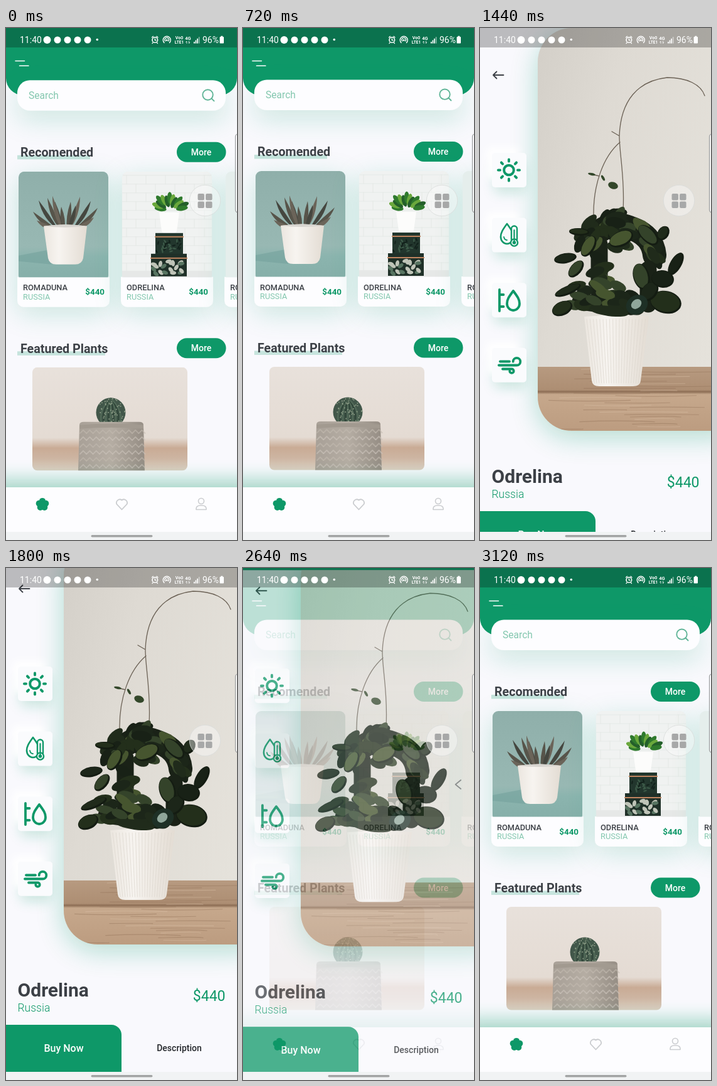
Recreate the animation shown at these times as an HTML page. Size 368x816 px, loop 3.24 s.

```html
<!DOCTYPE html>
<html lang="en">
<head>
<meta charset="utf-8">
<title>Plant shop</title>
<style>
html, body { margin: 0; width: 100%; height: 100%; overflow: hidden; background: #f9f9fd; }
svg { display: block; width: 100vw; height: 100vh; font-family: Roboto, sans-serif; }
</style>
</head>
<body>
<svg id="stage" viewBox="0 0 368 816" xmlns="http://www.w3.org/2000/svg"></svg>
<script>
const LOOP = 3240, STEP = 120;
const GREEN = '#0e9868', INK = '#3c4046', PAPER = '#f9f9fd';

// ---- drawing helpers ----
let seed = 7;
const rnd = (a = 0, b = 1) => {
  seed = (seed * 16807) % 2147483647;
  return a + (b - a) * seed / 2147483647;
};
const many = (n, fn) => Array.from({ length: n }, (_, i) => fn(i)).join('');
const rect = (x, y, w, h, fill, r = 0, more = '') =>
  `<rect x="${x}" y="${y}" width="${w}" height="${h}" rx="${r}" fill="${fill}" ${more}/>`;
const circle = (x, y, r, fill, more = '') => `<circle cx="${x}" cy="${y}" r="${r}" fill="${fill}" ${more}/>`;
const shape = (d, fill, more = '') => `<path d="${d}" fill="${fill}" ${more}/>`;
const line = (d, color, w, more = '') =>
  `<path d="${d}" fill="none" stroke="${color}" stroke-width="${w}" stroke-linecap="round" stroke-linejoin="round" ${more}/>`;
const text = (s, x, y, size, color, weight = 400, anchor = 'start') =>
  `<text x="${x}" y="${y}" font-size="${size}" fill="${color}" font-weight="${weight}" text-anchor="${anchor}">${s}</text>`;
const glow = (x, y, w, h, a, blur, r = 10) => rect(x, y, w, h, GREEN, r, `opacity="${a}" filter="url(#b${blur})"`);
const leaf = (x, y, rx, ry, turn, fill) =>
  `<ellipse rx="${rx}" ry="${ry}" fill="${fill}" transform="translate(${x} ${y}) rotate(${turn})"/>`;
const blade = (x, y, tx, ty, w, fill) => {
  const mx = (x + tx) / 2 + (tx - x) * .1, my = (y + ty) / 2 + 4;
  const len = Math.hypot(tx - x, ty - y), nx = (y - ty) / len * w, ny = (tx - x) / len * w;
  return shape(`M${x} ${y}Q${mx + nx} ${my + ny} ${tx} ${ty}Q${mx - nx} ${my - ny} ${x} ${y}`, fill);
};
const blur = n => `<filter id="b${n}" filterUnits="userSpaceOnUse" x="-150" y="-150" width="700" height="1200"><feGaussianBlur stdDeviation="${n}"/></filter>`;
const clip = (id, x, y, w, h, r) => `<clipPath id="${id}">${rect(x, y, w, h, '#000', r)}</clipPath>`;
const fade = (id, stops, dir = 'x2="0" y2="1"') => `<linearGradient id="${id}" x1="0" y1="0" ${dir}>` +
  stops.map(([o, c]) => `<stop offset="${o}" stop-color="${c}"/>`).join('') + '</linearGradient>';
const clipped = (id, body) => `<g clip-path="url(#${id})">${body}</g>`;

const defs = '<defs>' + [6, 10, 16, 22].map(blur).join('') +
  clip('pic1', 20, 228, 143, 175, 9) + clip('pic2', 185, 228, 143, 175, 9) +
  clip('pic3', 42, 540, 247, 164.5, 8) + clip('pic4', 92, 0, 330, 642, 54) +
  clip('page', 0, 0, 368, 816, 0) +
  fade('teal', [[0, '#8fafaa'], [.7, '#98b8b3'], [.8, '#8bb4ae'], [1, '#86afa9']]) +
  fade('sand', [[0, '#e8e1db'], [.68, '#e4dbd3'], [.78, '#c9ab95'], [.88, '#cdb5a2'], [1, '#dfd1c4']]) +
  fade('wall', [[0, '#d3cfc8'], [.35, '#dedad3'], [1, '#e5e2db']], 'x2="1" y2=".5"') +
  fade('pot', [[0, '#ebe6df'], [.35, '#f7f4f0'], [1, '#e3dcd3']], 'x2="1" y2="0"') +
  fade('stone', [[0, '#a8a097'], [.5, '#b5ada3'], [1, '#958d84']], 'x2="1" y2="0"') +
  fade('wood', [[0, '#b79a80'], [.36, '#ad8e73'], [.39, '#8c6d54'], [.43, '#c6a88c'], [1, '#bc9c80']]) +
  '</defs>';

// ---- pictures ----
const aloeTips = [
  [43, 292], [49, 306], [52, 274], [146, 286], [140, 301], [135, 275],
  [66, 270], [118, 268], [78, 276], [103, 276], [74, 267], [111, 282], [88, 284]
];
const aloe = rect(20, 228, 143, 170, 'url(#teal)') +
  shape('M20 362L72 352V376L20 371Z', '#76a29d', 'opacity=".6"') +
  aloeTips.map(([x, y], i) => blade(95 + (x - 95) * .28, 320, x, y, 6.5, ['#57544a', '#6b6459', '#454740'][i % 3])).join('') +
  shape('M60 315Q94 310 129 315L123 366Q121 376 110 376H80Q69 376 67 366Z', 'url(#pot)') +
  shape('M60 315Q94 310 129 315Q94 319 60 315', '#d8d5d0');

const boxes = rect(185, 228, 143, 170, '#f0f2f1') +
  many(12, r => line(`M185 ${234 + r * 14}H328` + many(5, k => `M${192 + k * 31 + (r % 2) * 15} ${234 + r * 14}v14`), '#e2e6e4', .8)) +
  rect(185, 386, 143, 12, '#e6e8e7') +
  many(13, i => {
    const a = (188 + i * 13.6) * Math.PI / 180, len = 13 + (i * 5 % 8);
    return leaf(261 + Math.cos(a) * len * 1.15, 289 + Math.sin(a) * len, 9.5, 4, 188 + i * 13.6, ['#2f7a2d', '#6aa83c', '#245f2a'][i % 3]);
  }) +
  shape('M244 293H276L272 323Q271 326 267 326H253Q249 326 248 323Z', '#fcfcfb') +
  rect(238, 326, 44, 35, '#22362d') + rect(231, 359, 57, 36, '#1f3028') +
  many(26, i => leaf(rnd(240, 280), rnd(336, 357), 3, 1.2, rnd(0, 180), i % 2 ? '#3c5a48' : '#12211b')) +
  many(18, i => leaf(rnd(235, 284), rnd(371, 391), 5, 3, rnd(0, 180), i % 3 ? '#bfc4b8' : '#577461')) +
  rect(237, 331, 46, 2, '#bf8560') + rect(230, 365, 59, 2, '#bf8560');

const cactus = rect(42, 540, 247, 165, 'url(#sand)') +
  circle(167, 612, 23.5, '#42574a') +
  many(9, i => line(`M167 590Q${143 + i * 6} 612 ${155 + i * 3} 636`, i % 2 ? '#2f4438' : '#526a58', 2)) +
  many(60, () => {
    const a = rnd(0, 6.28), r = 22.5 * Math.sqrt(rnd());
    return circle(167 + Math.cos(a) * r, 612 + Math.sin(a) * r, 1, '#8c9c86');
  }) +
  shape('M117 632Q117 627 124 627H212Q219 627 219 632L221 706H115Z', 'url(#stone)') +
  many(6, r => many(10, k => line(`M${118 + k * 10.4} ${645 + r * 11}l5 -5l5 5`, r % 2 ? '#cbc4bb' : '#c2bab0', 1.8, 'opacity=".6"'))) +
  shape('M117 632Q168 627 219 632L219 638Q168 634 117 638Z', '#a29a90');

// dark masses first, then scattered leaves, then the outer ones
const tones = ['#182116', '#232f1b', '#34432a', '#1c2619', '#46552f', '#202b1b'];
const tone = i => tones[i % tones.length];
const cluster = (n, x, y, w, h, tilt) => many(n, i =>
  leaf(x + rnd(-w, w), y + rnd(-h, h), rnd(12, 18), rnd(6.5, 9.5), tilt + rnd(-35, 35), tone(i)));
const bigLeaves = [
  [131, 447, 17, 11, -25], [153, 384, 16, 9, -50], [136, 367, 18, 8, -10], [173, 348, 18, 10, -60],
  [292, 327, 12, 9, -60], [312, 376, 20, 9, -60], [296, 437, 25, 18, 12], [257, 396, 21, 13, 75],
  [270, 420, 17, 12, -50], [225, 336, 20, 12, -25], [140, 418, 22, 7, -22], [291, 400, 18, 14, 8],
  [158, 325, 16, 6, 4], [268, 330, 20, 11, 45]
];
const ficus = rect(92, 0, 330, 642, 'url(#wall)') +
  rect(92, 540, 330, 102, 'url(#wood)') +
  many(26, i => line(`M${rnd(92, 260)} ${544 + i * 3.8}q60 ${rnd(-3, 3)} ${rnd(50, 150)} 0`, i % 3 ? '#8d6d53' : '#dcc3aa', 1.1, 'opacity=".4"')) +
  line('M181 300C180 250 196 205 223 182M228 290C231 240 222 200 222 172C224 115 252 84 298 79C330 79 352 90 358 108M210 165L222 172M190 236L174 232', '#6b6155', 1.3) +
  leaf(212, 251, 8, 5.5, 20, '#33472a') + leaf(178, 233, 6, 2, 12, '#33472a') + leaf(196, 239, 5, 2, 60, '#33472a') +
  line('M178 335Q205 305 238 318Q275 330 278 362', '#1a2217', 38) +
  line('M190 345V420M160 436Q200 442 250 444M268 385V440', '#1a2217', 27) +
  cluster(16, 200, 310, 28, 18, -30) + cluster(16, 244, 326, 30, 24, 25) +
  cluster(8, 172, 340, 16, 16, -40) + cluster(10, 190, 382, 12, 26, 15) +
  cluster(6, 274, 362, 9, 18, 50) + cluster(24, 195, 428, 50, 20, 8) +
  bigLeaves.map((l, i) => leaf(...l, '#141c12') + leaf(l[0] - 1, l[1] - 1, l[2] - 1.5, l[3] - 2, l[4], tone(i + 1))).join('') +
  shape('M166 460Q217 455 269 460L256 562Q255 571 244 571H190Q179 571 178 562Z', 'url(#pot)') +
  many(19, i => line(`M${170 + i * 5.2} 464L${182 + i * 3.9} 566`, '#dcd6cd', 1, 'opacity=".7"')) +
  leaf(205, 451, 32, 8, 8, '#202b1b') +
  leaf(250, 441, 18, 15, -30, '#1e3026') + leaf(249, 440, 9, 7, -40, '#8fa69a');

// ---- home page ----
const more = y => rect(272, y, 78.5, 32, GREEN, 16) + text('More', 311, y + 21, 14, '#fff', 500, 'middle');
const heading = (s, y, w) => rect(18, y + 5, w, 6.5, GREEN, 0, 'opacity=".22"') + text(s, 23, y + 7.3, 19.7, INK, 700) + more(y - 16);
const card = (x, name, pic) => glow(x, 238, 147, 216, .2, 22) +
  shape(`M${x} 396H${x + 147}V434a10 10 0 0 1 -10 10H${x + 10}a10 10 0 0 1 -10 -10Z`, '#fdfdff') + pic +
  rect(x, 396.5, 147, 20, '#fdfdff') +
  text(name, x + 9, 417.6, 12.8, INK, 500) + text('RUSSIA', x + 9, 432, 12.8, '#83c7ae') +
  text('$440', x + 139, 424.5, 13.4, GREEN, 700, 'end');

const tabs = glow(-30, 722, 430, 90, .4, 16, 0) + rect(0, 732, 368, 84, '#fdfdff') +
  many(5, i => {
    const a = (i * 72 - 90) * Math.PI / 180;
    return circle(58 + Math.cos(a) * 5.6, 759.5 + Math.sin(a) * 5.6, 5, GREEN);
  }) + circle(58, 759.5, 5, GREEN) +
  line('M184.5 767.5L176.5 759A5.3 5.3 0 0 1 184.5 752.5A5.3 5.3 0 0 1 192.5 759Z', '#cbcdd0', 1.8) +
  circle(311, 754, 4.5, 'none', 'stroke="#cbcdd0" stroke-width="1.6"') +
  line('M303 767.5V766a6 5 0 0 1 6 -5h4a6 5 0 0 1 6 5v1.5Z', '#cbcdd0', 1.6);

const home = rect(0, 0, 368, 816, PAPER) +
  shape('M0 0H368V80a27 27 0 0 1 -27 27H27a27 27 0 0 1 -27 -27Z', GREEN) +
  line('M15 52.5H29.5M21.5 60.2H36', '#fff', 1.5) +
  '<g id="list">' +
  glow(18, 100, 332, 44, .2, 22) +
  rect(18, 82.5, 332, 48.5, '#fdfdff', 20) +
  text('Search', 36, 112, 15.6, '#83c7ae') +
  circle(321.5, 105.7, 8.2, 'none', 'stroke="#5fb497" stroke-width="1.9"') + line('M327.5 111.5L331.5 115.5', '#5fb497', 1.9) +
  heading('Recomended', 197, 116) +
  card(18, 'ROMADUNA', clipped('pic1', aloe)) +
  card(183, 'ODRELINA', clipped('pic2', boxes)) +
  card(348, 'ROMADUNA', rect(350, 228, 143, 175, '#e5eeec', 9)) +
  heading('Featured Plants', 509.5, 140) +
  clipped('pic3', cactus) + '</g>' + tabs;

// ---- detail page ----
const tile = y => glow(23, y - 12, 48, 48, .2, 10, 5) +
  rect(11, y - 36, 50, 50, '#fff', 5, 'filter="url(#b6)"') + rect(19, y - 27.5, 55, 55, '#fafbfd', 5);
const drop = (x, y, w, h) => `M${x} ${y}C${x - w * .35} ${y + h * .3} ${x - w / 2} ${y + h * .45} ${x - w / 2} ${y + h * .65}` +
  `A${w / 2} ${h * .35} 0 0 0 ${x + w / 2} ${y + h * .65}C${x + w / 2} ${y + h * .45} ${x + w * .35} ${y + h * .3} ${x} ${y}`;
const icons = circle(46, 226.5, 7.8, 'none', `stroke="${GREEN}" stroke-width="4"`) +
  many(8, i => line('M46 212.5V209.5', GREEN, 4, `transform="rotate(${i * 45} 46 226.5)"`)) +
  line(drop(43, 312, 20, 32), GREEN, 2.6) + line('M38 333q1 5 5 5', GREEN, 1.8) +
  rect(50, 315.5, 9, 26, '#fafbfd', 4.5, `stroke="${GREEN}" stroke-width="2.4"`) +
  circle(54.5, 342, 5.6, '#fafbfd', `stroke="${GREEN}" stroke-width="2.4"`) + circle(54.5, 342, 2.8, GREEN) + line('M54.5 322V342', GREEN, 2.2) +
  line('M31 417V451M31 425H37.5M31 444H37.5', GREEN, 3.8) + line(drop(53, 419, 20, 31), GREEN, 3.8) +
  line('M32 531.5H47M30 537.5H58.5a5.8 5.8 0 1 0 -5.8 -5.8M36 543.5H50.5a3.2 3.2 0 1 1 -3.2 3.2', GREEN, 3.8);

const detail = glow(92, 12, 330, 640, .3, 22, 54) +
  line('M37.5 75H21M26.5 69.5L21 75L26.5 80.5', INK, 1.8) +
  many(4, i => tile(226.5 + i * 103.6)) + icons +
  clipped('pic4', ficus) +
  text('Odrelina', 18.5, 724.5, 30, INK, 700) + text('Russia', 18.5, 749, 17.5, GREEN, 300) +
  text('$440', 349.5, 731.5, 23, GREEN, 400, 'end') +
  shape('M0 770H168a16 16 0 0 1 16 16V870H0Z', GREEN) +
  text('Buy Now', 92, 812.5, 16, '#fff', 500, 'middle') + text('Description', 276, 812, 14, '#24272b', 500, 'middle');

// ---- system overlays ----
const status = rect(0, 0, 368, 31, '#000', 0, 'opacity=".25"') +
  text('11:40', 22, 24, 14, '#fff') + circle(65.5, 19, 6, '#fff') +
  many(4, i => circle(82 + i * 16, 19, 5.5, '#fff')) + circle(145.3, 18.5, 1.8, '#fff') +
  circle(237.3, 19, 4.3, 'none', 'stroke="#fff" stroke-width="1.6"') +
  line('M237.3 17V19.5H239M232.5 15L234.5 13.3M242 15L240 13.3M234 23.5L233 24.5M240.5 23.5L241.5 24.5', '#fff', 1.3) +
  line('M252 23.5A6 6 0 1 1 260.5 23.5M253.8 20.8A3.2 3.2 0 1 1 258.7 20.8', '#fff', 1.4) + circle(256.2, 19.5, 1.4, '#fff') +
  text('Vo0', 276, 18, 7, '#fff', 700, 'middle') + text('LTE1', 276, 24.5, 6.5, '#fff', 700, 'middle') +
  text('4G', 290, 18.5, 7.5, '#fff', 700, 'middle') +
  line('M288 24.5V21L286.5 22.5M291.5 21V24.5L293 23', '#fff', 1, 'opacity=".8"') +
  many(4, i => rect(299 + i * 2.6, 22 - i * 2.6, 1.7, 2.6 + i * 2.6, '#fff', 0, i > 2 ? 'opacity=".5"' : '')) +
  text('96%', 313, 24, 14, '#fff') + rect(340.5, 14, 6.5, 10.5, '#fff', 1) + rect(342.3, 12.7, 3, 2, '#fff');

const overlays = status +
  rect(0, 803, 368, 13, '#f1f3f4') + rect(135.5, 808, 98, 3.6, '#a2a4a4', 1.8) +
  rect(365.5, 169, 12, 125, '#fff', 4, 'stroke="#9a9c9e" stroke-width="1.2" fill-opacity=".7"') +
  circle(317, 275, 24.7, '#fafafa', 'fill-opacity=".42" stroke="#d9dbda" stroke-opacity=".8"') +
  many(4, i => rect(305.5 + (i % 2) * 12.6, 264 + (i >> 1) * 12.6, 10.4, 10.4, '#a7a8a8', 2)) +
  line('M347 338L338.5 345L347 352', '#8b8f8e', 1.8, 'id="back"');

const stage = document.getElementById('stage');
stage.innerHTML = defs + home +
  `<g id="sheet" clip-path="url(#page)">${rect(0, 0, 368, 816, PAPER)}<g id="scroll">${detail}</g></g>` + overlays;
const [list, sheet, scroll, back] = ['list', 'sheet', 'scroll', 'back'].map(id => document.getElementById(id));

// ---- motion ----
const clamp = v => Math.max(0, Math.min(1, v));
const bezier = (x1, y1, x2, y2) => x => {
  const at = (a, b, u) => 3 * a * u * (1 - u) ** 2 + 3 * b * u * u * (1 - u) + u ** 3;
  let lo = 0, hi = 1;
  for (let i = 0; i < 24; i++) {
    const mid = (lo + hi) / 2;
    if (at(x1, x2, mid) < x) lo = mid; else hi = mid;
  }
  return at(y1, y2, lo);
};
const slide = bezier(.4, 0, .2, 1), easeIn = bezier(.42, 0, 1, 1);
const move = (el, y) => el.setAttribute('transform', `translate(0 ${y.toFixed(2)})`);

function draw(time) {
  // the picture advances in even steps
  const t = Math.floor((time % LOOP) / STEP) * STEP;
  const open = t < 2400 ? clamp((t - 1083) / 300) : 1 - clamp((t - 2591) / 300);
  move(list, .8 * (1 - clamp(t / 600)) ** 2);
  move(sheet, 204 * (1 - slide(open)));
  sheet.setAttribute('opacity', easeIn(open).toFixed(3));
  sheet.setAttribute('visibility', open > 0 ? 'visible' : 'hidden');
  move(scroll, -42 * (1 - (1 - clamp((t - 1440) / 340)) ** 2));
  back.setAttribute('opacity', t >= 2640 ? clamp((2960 - t) / 200) : 0);
}

const start = performance.now();
function tick() {
  draw(Math.max(0, performance.now() - start));
  requestAnimationFrame(tick);
}
tick();
</script>
</body>
</html>
```
